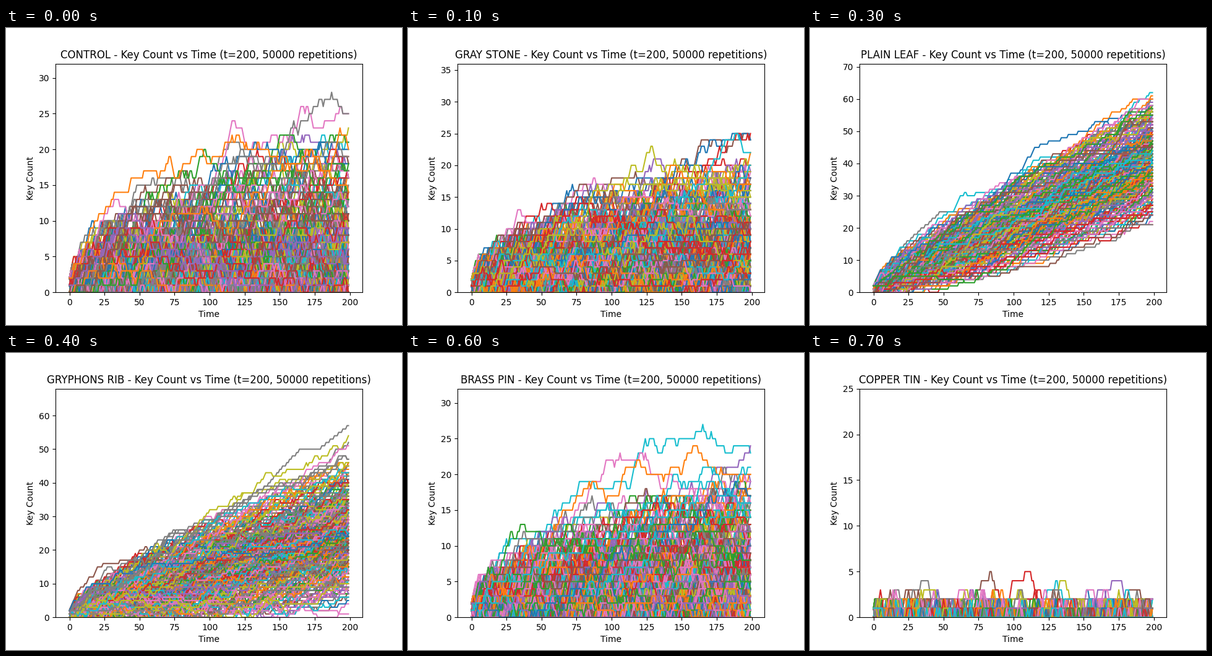
Animation, 640 px wide and 480 px high, one loop 800 ms. Source, as a matplotlib script:

```python
import numpy as np
import matplotlib.pyplot as plt
from matplotlib.animation import FuncAnimation
from matplotlib.collections import LineCollection

STEPS = 200
TIMES = np.arange(STEPS)
SHOWN = 500      # ordinary runs drawn per scene
EDGE = 9         # highest and lowest runs kept at each checkpoint


def simulate(seed, count, up, down, jump=1, start=3):
    """Random integer walks that never go below zero."""
    rng = np.random.default_rng(seed)
    chance = rng.random((count, STEPS))
    moves = np.where(chance < up, jump, 0) - (chance > 1 - down)
    walks = np.empty((count, STEPS))
    walks[:, 0] = rng.integers(0, start, count)
    for t in range(1, STEPS):
        walks[:, t] = np.maximum(walks[:, t - 1] + moves[:, t], 0)
    return walks


def visible_runs(walks):
    """Indices of a sample of the runs plus those that shape the outline."""
    picks = [np.arange(min(SHOWN, len(walks)))]
    for t in range(6, STEPS, 8):
        order = np.argsort(walks[:, t], kind="stable")
        picks += [order[:EDGE], order[-EDGE:]]
    return np.unique(np.concatenate(picks))


def leader(points):
    """Staircase from the start through a few (time, count) points."""
    t, y = zip((0, 1), *points)
    return np.round(np.interp(TIMES, t, y))


# title, top of the y axis, walk settings, key points of the leading run
SCENES = [
    ("CONTROL", 32, dict(count=2500, up=.13, down=.145),
     [(102, 14), (107, 19), (116, 21), (128, 20), (133, 18), (199, 9)]),
    ("GRAY STONE", 36, dict(count=2500, up=.14, down=.145), []),
    ("NANS RUG", 72, dict(count=4000, up=.185, down=.062),
     [(66, 24), (75, 31), (104, 31), (129, 43), (188, 49), (199, 61)]),
    ("PLAIN LEAF", 71, dict(count=3000, up=.207, down=.006),
     [(20, 14), (48, 25), (72, 25), (199, 45)]),
    ("GRYPHONS RIB", 68, dict(count=4000, up=.187, down=.068),
     [(140, 39), (153, 45), (165, 50), (178, 50), (199, 57)]),
    ("AGREEMENT OF HOLLOW", 40, dict(count=1500, up=.065, down=.24, jump=2),
     [(98, 15), (107, 21), (118, 18), (125, 21), (138, 20), (199, 3)]),
    ("BRASS PIN", 32, dict(count=2500, up=.13, down=.145), []),
    ("COPPER TIN", 25, dict(count=330, up=.04, down=.3, start=2), []),
]

fig, ax = plt.subplots(figsize=(6.4, 4.8), dpi=100)


def draw(frame):
    name, top, settings, points = SCENES[frame]
    ax.clear()
    walks = simulate(40 + frame, **settings)
    if points:
        walks[7] = leader(points)
    runs = visible_runs(walks)
    lines = [np.column_stack([TIMES, walks[i]]) for i in runs]
    ax.add_collection(LineCollection(lines, colors=[f"C{i % 10}" for i in runs],
                                     linewidths=1.5, capstyle="projecting",
                                     joinstyle="round"), autolim=False)
    margin = 0.05 * (STEPS - 1)
    ax.set_xlim(-margin, STEPS - 1 + margin)
    ax.set_ylim(0, top)
    ax.set_xticks(range(0, 201, 25))
    ax.set_yticks(range(0, top + 1, 5 if top <= 40 else 10))
    ax.set_xlabel("Time")
    ax.set_ylabel("Key Count")
    ax.set_title(f"{name} - Key Count vs Time (t=200, 50000 repetitions)")
    return []


anim = FuncAnimation(fig, draw, frames=len(SCENES), init_func=lambda: [],
                     interval=100, repeat=True, repeat_delay=0)
plt.show()
```
